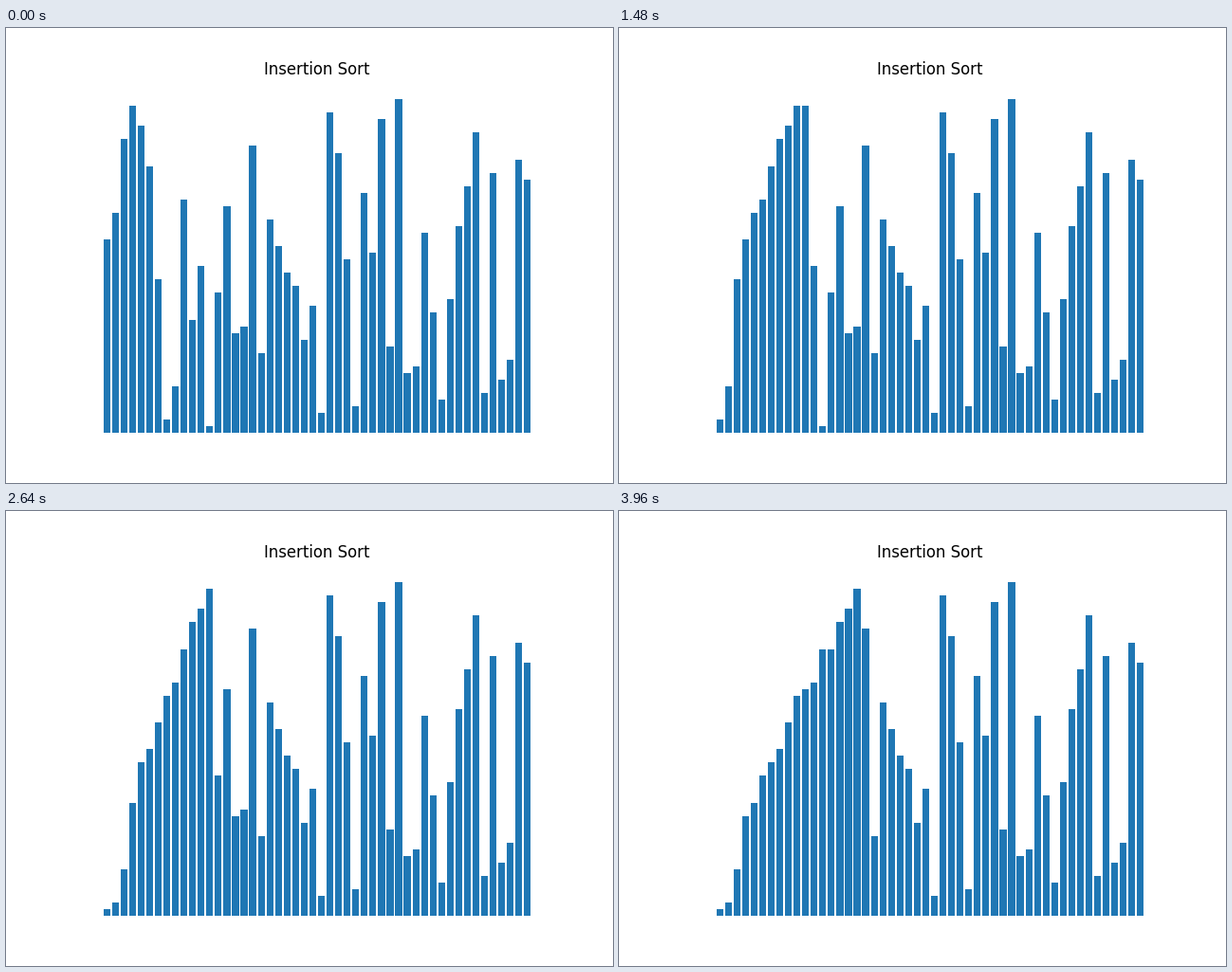
Write a matplotlib script that moves like this. It is 640 by 480 pixels and loops after 4 s.

```python
from itertools import islice

import matplotlib.pyplot as plt
from matplotlib.animation import FuncAnimation

FRAMES = 100
INTERVAL = 40

# The shuffled input; every later state follows from sorting it.
START = [
    29, 33, 44, 49, 46, 40, 23, 2, 7, 35, 17, 25, 1, 21, 34, 15, 16,
    43, 12, 32, 28, 24, 22, 14, 19, 3, 48, 42, 26, 4, 36, 27, 47, 13,
    50, 9, 10, 30, 18, 5, 20, 31, 37, 45, 6, 39, 8, 11, 41, 38,
]


def insertion_sort(values):
    """Yield a copy of the list after every shift and every placement."""
    a = list(values)
    for i in range(1, len(a)):
        key = a[i]
        j = i - 1
        while j >= 0 and a[j] > key:
            a[j + 1] = a[j]
            j -= 1
            yield a[:]
        a[j + 1] = key
        yield a[:]


states = list(islice(insertion_sort(START), FRAMES))

fig, ax = plt.subplots(figsize=(6.4, 4.8), dpi=100)
# Just under 12 pt, so that hinting rounds the x-height down to 9 px.
ax.set_title("Insertion Sort", fontname="DejaVu Sans", fontsize=11.875)
ax.axis("off")
bars = ax.bar(range(len(START)), START, color="#1f77b4")


def update(frame):
    for bar, height in zip(bars, states[frame]):
        bar.set_height(height)
    return bars


anim = FuncAnimation(fig, update, frames=FRAMES, interval=INTERVAL,
                     repeat=True, repeat_delay=0)
plt.show()
```
